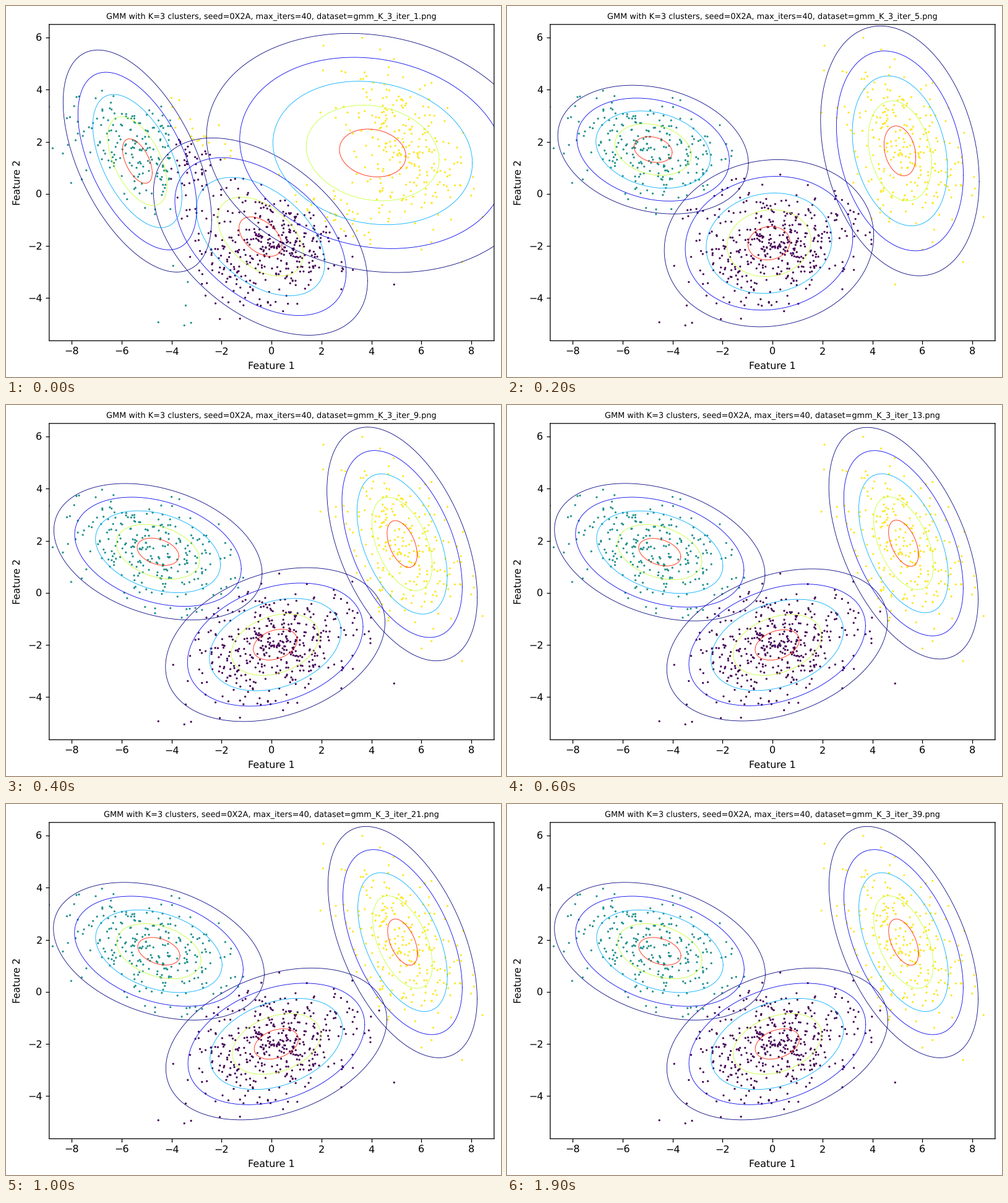
Write a matplotlib script that moves like this. It is 800 by 600 pixels and loops after 2000 ms.

```python
import numpy as np
import matplotlib.pyplot as plt
from matplotlib.animation import FuncAnimation

W, H, DPI = 800, 600, 100
FRAMES, INTERVAL = 20, 100
SCALE = 1.156                   # type and line scale
LEFT, RIGHT, TOP, BOTTOM = 69.8, 788.8, 29.8, 541.4

SIGMAS = np.arange(1, 6) / 2
COUNTS = np.array([425, 265, 250])
WEIGHTS = COUNTS / COUNTS.sum()

# Mean x, mean y, deviation x, deviation y and correlation of each cluster.
START = np.array([[-0.44, -1.64, 1.714, 1.515, -0.45],
                  [-5.37, 1.26, 1.189, 1.705, -0.53],
                  [4.05, 1.57, 2.661, 1.836, -0.14]])
EARLY = np.array([[-0.14, -1.895, 1.677, 1.284, 0.085],
                  [-4.78, 1.70, 1.526, 0.988, -0.215],
                  [5.10, 1.65, 1.270, 1.918, -0.245]])
FINAL = np.array([[0.193, -2.00, 1.769, 1.166, 0.32],
                  [-4.51, 1.56, 1.688, 1.057, -0.33],
                  [5.247, 1.91, 1.194, 1.776, -0.49]])

STRAYS = [(-4.53, -4.93), (-3.49, -5.05), (-3.22, -4.95), (-8.91, 3.34),
          (-8.76, 1.75), (-8.02, 0.42), (8.45, -0.89), (7.63, -2.62),
          (4.91, -3.48), (2.08, 5.69), (2.06, 4.74), (1.96, 3.12)]


def place(fit, u, v):
    """Map standard normal coordinates to the plane of a cluster."""
    mx, my, sx, sy, rho = fit
    return mx + sx * u, my + sy * (rho * u + np.sqrt(1 - rho * rho) * v)


def make_points():
    rng = np.random.default_rng(42)
    parts = [STRAYS]
    for fit, count in zip(FINAL, COUNTS):
        u, v = rng.standard_normal((2, count * 2))
        near = np.hypot(u, v) < 2.5
        parts.append(np.column_stack(place(fit, u[near], v[near]))[:count])
    return rng.permutation(np.vstack(parts)).T


def fits_at(step):
    """Quick first moves, then a geometric approach to the final fit."""
    if step < 2:
        return START + (0, 0.62)[step] * (EARLY - START)
    return FINAL + (EARLY - FINAL) * 0.36 ** (step - 2)


def labels_at(step, x, y):
    if step == 0:
        # The opening assignment has nearly straight borders.
        teal = x < -4.03 + 0.31 * np.maximum(0, -0.87 - y)
        yellow = y > 0.17 - 0.575 * x
        return np.where(teal, 1, np.where(yellow, 2, 0))
    scores = []
    for (mx, my, sx, sy, rho), weight in zip(fits_at(step), WEIGHTS):
        a, b = (x - mx) / sx, (y - my) / sy
        rest = 1 - rho * rho
        dist = (a * a - 2 * rho * a * b + b * b) / rest
        scores.append(np.log(weight / (sx * sy * np.sqrt(rest))) - dist / 2)
    return np.argmax(scores, axis=0)


plt.rcParams.update({
    "font.family": "DejaVu Sans",
    "font.size": 10 * SCALE,
    "text.hinting": "none",
    "axes.linewidth": 0.8 * SCALE,
})

fig = plt.figure(figsize=(W / DPI, H / DPI), dpi=DPI, facecolor="white")
ax = fig.add_axes([LEFT / W, 1 - BOTTOM / H,
                   (RIGHT - LEFT) / W, (BOTTOM - TOP) / H])
ax.set(xlim=(-8.90, 8.91), ylim=(-5.64, 6.505),
       xticks=range(-8, 9, 2), yticks=range(-4, 7, 2))
ax.tick_params(width=0.8 * SCALE, length=3.5 * SCALE, pad=3.5 * SCALE)
ax.tick_params(axis="x", pad=3 * SCALE)
for spine in ax.spines.values():
    spine.set_snap(False)


def write(x, y, text, **style):
    return fig.text(x / W, 1 - y / H, text, ha="center", va="baseline",
                    rotation_mode="anchor", **style)


write(429, 586.5, "Feature 1")
write(24, 285.5, "Feature 2", rotation=90, size=9.7 * SCALE)
title = write(429.1, 20.5, "", size=8 * SCALE)

points = make_points()
palette = plt.get_cmap("viridis")([0.0, 0.5, 1.0])
dots = ax.scatter(*points, s=5.4, linewidths=0, zorder=1)

# Contour colours follow the density on each ellipse.
density = np.exp(-SIGMAS ** 2 / 2)
ring_colors = plt.get_cmap("jet")((density - density[-1]) / (1 - density[-1]))
rings = [[ax.plot([], [], color=c, lw=0.6, zorder=2)[0] for c in ring_colors]
         for _ in FINAL]
turn = np.linspace(0, 2 * np.pi, 241)


def update(step):
    title.set_text("GMM with K=3 clusters, seed=0X2A, max_iters=40, "
                   f"dataset=gmm_K_3_iter_{2 * step + 1}.png")
    dots.set_facecolor(palette[labels_at(step, *points)])
    for fit, group in zip(fits_at(step), rings):
        for r, line in zip(SIGMAS, group):
            line.set_data(*place(fit, r * np.cos(turn), r * np.sin(turn)))
    return [title, dots, *sum(rings, [])]


anim = FuncAnimation(fig, update, frames=FRAMES, interval=INTERVAL,
                     init_func=lambda: update(0), repeat=True,
                     repeat_delay=0, blit=False)
plt.show()
```
